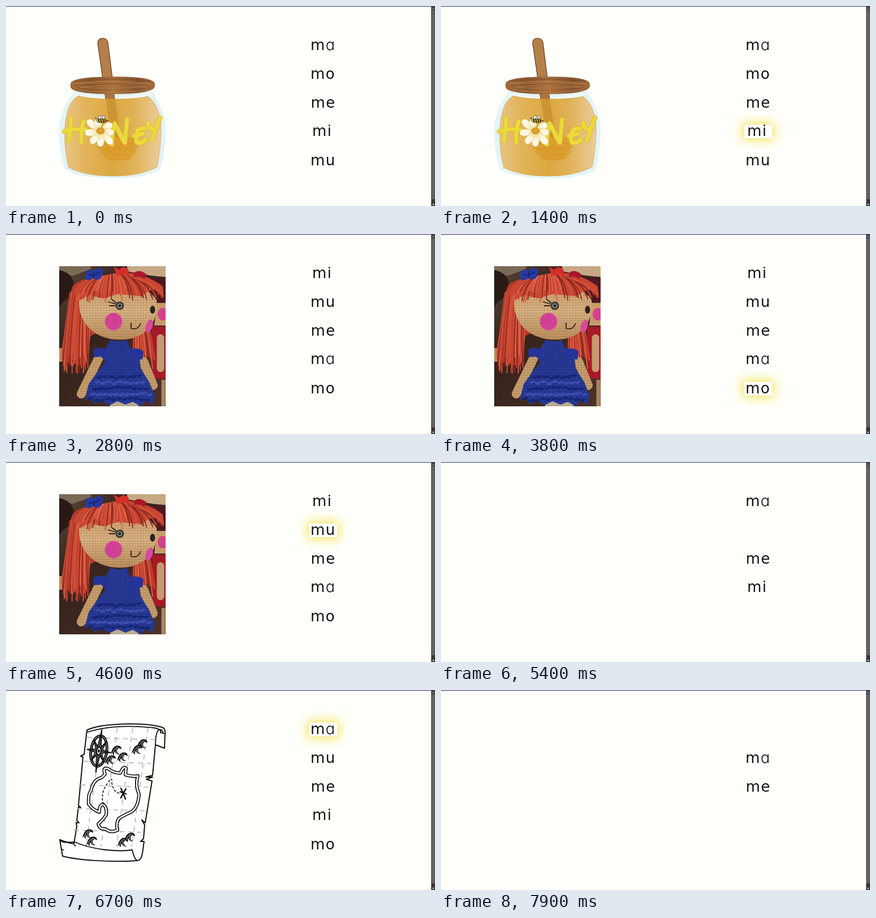
Write an HTML page that moves like this. It is 758x354 px and loops after 8 s.

```html
<!DOCTYPE html>
<html lang="en">
<head>
<meta charset="utf-8">
<title>Syllable match</title>
<style>
  html, body { margin: 0; width: 100%; height: 100%; overflow: hidden; background: #fffffb; }
  svg { position: absolute; left: 0; top: 0; }
  #glow { position: absolute; left: 536px; width: 49px; height: 24px; background: #fffffe;
    box-shadow: 0 0 18px 4px #f3e766; }
  .word { position: absolute; white-space: pre; color: #111;
    font: 26px/40px "DejaVu Sans", sans-serif; letter-spacing: 1.3px; }
  .word i { font: 350 27px/1 Inter, sans-serif; font-feature-settings: "cv11"; font-optical-sizing: none; }
</style>
</head>
<body>
<svg id="stage" width="758" height="354" viewBox="0 0 758 354">
  <defs>
    <linearGradient id="honeyFill">
      <stop offset="0" stop-color="#e9c587"/><stop offset=".2" stop-color="#e3b45c"/>
      <stop offset=".5" stop-color="#dba83f"/><stop offset=".72" stop-color="#e0b158"/>
      <stop offset="1" stop-color="#ebcd9c"/>
    </linearGradient>
    <linearGradient id="lidFill">
      <stop offset="0" stop-color="#a06a3a"/><stop offset=".25" stop-color="#8a5630"/>
      <stop offset=".5" stop-color="#a9713c"/><stop offset=".8" stop-color="#855230"/>
      <stop offset="1" stop-color="#a36d3e"/>
    </linearGradient>
    <linearGradient id="petalFill">
      <stop offset="0" stop-color="#f3dc8c"/><stop offset=".5" stop-color="#fdf6dc"/>
      <stop offset="1" stop-color="#fffdf2"/>
    </linearGradient>
    <linearGradient id="backFill" x2=".9" y2="1">
      <stop offset="0" stop-color="#5d4a3a"/><stop offset=".35" stop-color="#33221c"/>
      <stop offset="1" stop-color="#4b3026"/>
    </linearGradient>
    <linearGradient id="skin" x2="0" y2="1">
      <stop offset="0" stop-color="#cda06c"/><stop offset=".5" stop-color="#dcb686"/>
      <stop offset="1" stop-color="#be925f"/>
    </linearGradient>
    <pattern id="knit" width="5" height="4.6" patternUnits="userSpaceOnUse">
      <path d="M0 1Q2.5 3 5 1M2 3.4h2" fill="none" stroke="#6e4524" stroke-opacity=".36"/>
    </pattern>
    <pattern id="knitBlue" width="5" height="4.6" patternUnits="userSpaceOnUse">
      <path d="M0 1Q2.5 3 5 1M2 3.4h2" fill="none" stroke="#0f1858" stroke-opacity=".5"/>
    </pattern>
    <clipPath id="photo"><path d="M94 57h188v248H94z"/></clipPath>
    <path id="face" d="M130 112C124 150 150 187 202 187C246 187 270 157 266 117C245 80 150 76 130 112Z"/>
    <path id="dress" d="M185 187Q200 193 213 187L218 201L235 210L238 238L253 262L263 286L258 303L248 294L238 305L224 297L211 302L197 296L183 303L169 295L157 301L148 291L139 294L146 266L162 243L175 228L172 208Z"/>
    <path id="arms" d="M164 219L133 283M243 226L260 268"/>
    <path id="isle" d="M175 149Q170 136 180 139Q190 147 202 147Q208 133 212 139L211 150Q224 154 233 152Q228 169 235 184Q234 208 221 216Q207 222 199 228Q194 237 197 248Q185 254 176 246Q165 247 163 237Q172 229 177 221Q179 207 171 202Q164 205 165 216Q154 213 146 202Q145 183 150 179Q154 158 169 155Z"/>
    <g id="wave">
      <path d="M-11 9C-9 -3 -3 -10 5 -8C9 -7 11 -3 9 -1C7 -4 3 -4 2 -1C0 4 3 7 7 9C2 9 -2 7 -3 3C-5 5 -5 7 -4 10C-7 9 -8 7 -8 5Z" fill="#111"/>
      <path d="M-7 5C-5 -1 -1 -6 4 -5M0 -2C-2 2 0 5 2 7" fill="none" stroke="#fff" stroke-width=".9"/>
    </g>
  </defs>

  <g id="honey">
    <path d="M121 150C115 164 94 178 94 224C94 250 99 274 104 290C128 302 160 305 190 305C222 305 253 301 272 290C278 272 282 247 282 218C281 181 264 166 259 150Z" fill="#e3f4f7"/>
    <path d="M121 157Q188 172 258 155" fill="none" stroke="#fff" stroke-width="5" opacity=".5"/>
    <path d="M162 66C161 55 178 54 180 64L188 128H171Z" fill="#b57f49" stroke="#69452a" stroke-width="1.3"/>
    <path d="M174 151H190L203 230H185Z" fill="#a87440" stroke="#805527"/>
    <path d="M128 159C150 166 225 167 250 160C262 166 275 190 274 222C273 250 270 270 267 285C240 298 215 301 190 301C160 301 133 297 111 286C106 268 103 245 104 219C106 184 114 167 128 159Z" fill="url(#honeyFill)" stroke="#d8a446" stroke-width=".8"/>
    <path d="M176 164H192L203 232H186Z" fill="#c98e2f" opacity=".75"/>
    <g id="dipper" fill="#dd9d2b" stroke="#cf8f25"></g>
    <path d="M114 138C114 128 150 125 190 125C237 125 263 129 263 138V143C259 153 226 156 189 156C150 156 117 153 114 144Z" fill="url(#lidFill)"/>
    <path d="M118 137Q190 130 258 138Q190 137 118 137M130 144Q185 136 249 143Q190 147 130 144M124 148Q190 157 252 148" fill="none" stroke="#b98148" stroke-width="1.7" opacity=".65"/>
    <path d="M121 133Q190 126 256 133M140 140Q190 136 231 140" fill="none" stroke="#6d4124" stroke-width="2" opacity=".45"/>
    <g id="label" fill="none" stroke-linecap="round" stroke-linejoin="round"></g>
    <g id="petals" fill="url(#petalFill)" stroke="#e2c46f" stroke-width=".6"></g>
    <ellipse cx="167" cy="221" rx="7" ry="5.5" fill="#dda02c" stroke="#b77c1c" stroke-width=".8"/>
    <ellipse cx="167" cy="198" rx="3" ry="4" fill="#fff" stroke="#444" stroke-width=".7" transform="rotate(-20 167 198)"/>
    <ellipse cx="172" cy="198" rx="2.6" ry="4" fill="#eef" stroke="#444" stroke-width=".7" transform="rotate(15 172 198)"/>
    <ellipse cx="169" cy="203" rx="9" ry="3.6" fill="#e5bd27" stroke="#222" stroke-width=".8"/>
    <path d="M163 200l2 6M167 200l2 6M171 200l2 6M175 201l1 4M160 200l-2 -2M179 203l2 0" stroke="#1b1714" stroke-width="1.7"/>
  </g>

  <g id="doll" clip-path="url(#photo)">
    <path d="M94 57h188v248H94z" fill="url(#backFill)"/>
    <path d="M214 57H282V76Q250 74 214 66Z" fill="#c5a984"/>
    <path d="M94 57H150V62L118 74 94 68Z" fill="#7b6a55"/>
    <path d="M94 64C112 66 124 82 119 98C112 120 104 112 94 130Z" fill="#2a1a16"/>
    <path d="M94 202h6v24h-6z" fill="#b98d61"/>
    <path d="M250 80Q276 72 282 84V120H262Z" fill="#501621"/>
    <path d="M266 122H282V162H262Z" fill="#c99a6c"/>
    <ellipse cx="277" cy="142" rx="9" ry="11" fill="#d3418c"/>
    <path d="M258 164H282V256H258Z" fill="#a51a26"/>
    <path d="M273 184V238" stroke="#c49a70" stroke-width="13" stroke-linecap="round"/>
    <path d="M278 258V305" stroke="#a98461" stroke-width="7"/>
    <path d="M118 92C130 78 160 74 200 78L216 150L150 180C143 200 148 220 138 234L104 226C108 180 104 125 118 92Z" fill="#b63a29"/>
    <path d="M222 165L252 160C262 185 258 205 262 225L226 200Z" fill="#a93425"/>
    <g id="tails" fill="none" stroke-width="1.8" stroke-linecap="round"></g>
    <use href="#face" fill="url(#skin)"/>
    <use href="#face" fill="url(#knit)"/>
    <g fill="none" stroke="#a92975" id="cheek"><circle cx="190" cy="155" r="15.5" fill="#d9489a" stroke="none"/></g>
    <ellipse cx="253" cy="163" rx="6" ry="12" fill="#d9489a" transform="rotate(18 253 163)"/>
    <circle cx="201" cy="127" r="7.5" fill="#3b3935"/><circle cx="201" cy="127" r="4.6" fill="#7b8080"/><circle cx="201" cy="127" r="2.2" fill="#171717"/>
    <ellipse cx="259" cy="134" rx="4.5" ry="7" fill="#28231f"/>
    <path d="M180 120l14 4M182 127l11 0M187 116l8 6M221 157V167Q233 171 238 158" fill="none" stroke="#30211b" stroke-width="1.8"/>
    <path d="M119 105C126 82 151 75 177 74C205 62 247 69 277 93L279 110L260 97L238 110L198 106L172 114L147 108L131 117Z" fill="#c94731"/>
    <g id="fringe" fill="none" stroke-width="1.8" stroke-linecap="round"></g>
    <path d="M140 70Q146 58 155 65Q166 55 172 66L168 78Q160 84 154 78Q144 86 140 78Z" fill="#2739a0"/>
    <path d="M146 72l9 1 11 -6M155 66v12" stroke="#17236d" stroke-width="2" fill="none"/>
    <path d="M190 58l10 5 7 -5 9 4 2 11 -13 -1 -9 2Z" fill="#d42f29"/>
    <path d="M226 69q9 -8 22 2l-3 9q-10 -7 -19 -3Z" fill="#a9182c"/>
    <g fill="none" stroke-width="16" stroke-linecap="round">
      <use href="#arms" stroke="#c9a06f"/><use href="#arms" stroke="url(#knit)"/>
    </g>
    <path d="M184 294h50v11h-50z" fill="#b9aa93"/>
    <use href="#dress" fill="#293c99"/>
    <use href="#dress" fill="url(#knitBlue)"/>
    <path d="M154 205Q165 197 181 207L176 226L168 217L155 218ZM218 204Q236 200 243 208L241 222L230 221L222 226Z" fill="#263398"/>
    <g id="lace" fill="none" stroke-width="2"></g>
  </g>

  <g id="map" fill="none" stroke="#111" stroke-width="1.8" stroke-linejoin="round" stroke-linecap="round">
    <path d="M143 71C170 58 245 57 276 66Q282 68 281 77L280 103L264 97L259 151L247 154L259 154L248 158L258 161L246 235L240 230L245 239L243 263L238 268L244 268C241 285 242 301 232 302C190 305 130 302 100 294L95 265Q109 271 120 272L125 242L124 235L129 235L125 231L128 207L132 208L128 204L136 119L132 117L138 114Z" fill="#fffffd" stroke-width="2"/>
    <g id="grid" stroke="#b1b1b1" stroke-width="1.5" stroke-dasharray="9 7" stroke-linecap="butt"></g>
    <path d="M143 75Q190 59 262 67Q276 70 273 76M264 97Q264 78 269 71Q276 68 278 77M273 75l6 2"/>
    <path d="M95 265Q109 271 121 269C154 283 196 287 223 283Q227 300 232 302M121 269Q118 274 123 276M97 268l7 2M98 282l4 1" fill="#fffffd"/>
    <use href="#isle" stroke-width="6"/>
    <use href="#isle" stroke="#fffffd" stroke-width="2.6"/>
    <path d="M172 202Q166 181 181 163Q188 151 187 165Q191 185 204 182" stroke-dasharray="3 4" stroke-width="1.6"/>
    <path d="M203 174Q207 182 211 193M212 175Q207 182 203 191M202 180l10 4" stroke-width="2.4"/>
    <g transform="rotate(8 164 108)">
      <ellipse cx="164" cy="108" rx="14" ry="27" stroke-width="5"/>
      <ellipse cx="164" cy="108" rx="14" ry="27" stroke="#aaa" stroke-width="1"/>
      <path d="M164 70L167 100L175 90L170 105L185 108L170 111L175 126L167 116L164 146L161 116L153 126L158 111L143 108L158 105L153 90L161 100Z" fill="#777" stroke-width="1.6"/>
      <path d="M164 70V146M143 108H185M153 90L175 126M175 90L153 126" stroke-width="1.2"/>
      <ellipse cx="164" cy="108" rx="4" ry="7" fill="#eee" stroke-width="2.2"/><ellipse cx="164" cy="108" rx="1" ry="2"/>
    </g>
    <g id="waves" stroke="none"></g>
  </g>

  <path d="M0 0H758V1H0Z" fill="#352c5c"/>
  <path d="M751 1H758V354H751Z" fill="#626262"/>
  <path d="M752 1H758V8H752Z" fill="#4a4648"/>
  <path d="M752 342H758V354H752Z" fill="#3b3638"/>
  <path d="M753 6l2 -3 2 3Z" fill="#777"/>
  <path d="M753 350l2 3 2 -3Z" fill="#ccc"/>
</svg>
<div id="glow"></div>
<script>
const $ = id => document.getElementById(id);
const add = (id, markup) => $(id).insertAdjacentHTML('beforeend', markup);

let seed = 7;
const rnd = (a, b) => {
  seed = (seed * 16807) % 2147483647;
  return a + (b - a) * seed / 2147483647;
};
const mix = (a, b, t) => a + (b - a) * t;

// Honey jar
[[197, 239, 35], [197, 249, 35], [198, 258, 31], [198, 267, 24]].forEach(([x, y, r]) =>
  add('dipper', `<ellipse cx="${x}" cy="${y}" rx="${r}" ry="${r > 30 ? 8 : 6}" opacity=".8"/>`));
const letters = 'M115 199Q114 222 111 239M137 204Q132 224 133 241M103 222Q120 216 141 219' +
  'M192 208Q186 228 187 245M192 208L209 241M214 201L210 242' +
  'M246 217Q236 215 232 222Q228 240 232 242Q240 243 247 237M226 230L242 226' +
  'M251 207Q253 219 262 218M272 198Q263 222 258 237';
[['#cfb02e', 8.6], ['#ecd93a', 7.2]].forEach(([color, w]) =>
  add('label', `<path d="${letters}" stroke="${color}" stroke-width="${w}"/>`));
[[-142, 30], [-108, 22], [-32, 24], [8, 24], [48, 31], [90, 28], [127, 28], [171, 28]].forEach(([deg, len]) =>
  add('petals', `<path d="M3 0C8 -7 ${len - 6} -9 ${len} -2Q${len} 7 ${len - 9} 6Q10 6 3 0Z" transform="translate(167 221) rotate(${deg})"/>`));

// Doll: yarn, cheek and lace
const yarn = ['#e2654b', '#d5513a', '#c54430', '#8e281f'];
function strands(id, n, from, to, bend) {
  for (let i = 0; i < n; i++) {
    const t = i / (n - 1);
    const [x, y] = from(t), [u, v] = to(t);
    add(id, `<path d="M${x} ${y}Q${mix(x, u, .5) + bend(t)} ${mix(y, v, .4)} ${u} ${v}" stroke="${yarn[Math.floor(rnd(0, 4))]}"/>`);
  }
}
strands('tails', 42, t => [mix(113, 149, t), mix(104, 86, t)],
  t => [mix(98, 146, t), rnd(215, 249)], () => rnd(-5, 3));
strands('tails', 20, t => [mix(225, 252, t), 164], t => [mix(224, 263, t), rnd(205, 240)], () => rnd(-4, 4));
strands('fringe', 58, t => [mix(154, 235, t), 81 - 10 * Math.sin(Math.PI * t)],
  t => [mix(124, 278, t), rnd(101, 123) - 8 * t], t => mix(-9, 15, t));
[12, 8.5, 5, 2].forEach(r => add('cheek', `<circle cx="190" cy="155" r="${r}" stroke-dasharray="3 1"/>`));
for (let row = 0; row < 5; row++) {
  const y = 251 + row * 10, left = 160 - row * 4, right = 238 + row * 4;
  for (let x = left; x < right; x += 10)
    add('lace', `<path d="M${x} ${y + rnd(-2, 2)}q5 ${rnd(5, 9)} 10 0m-7 4l4 -5" stroke="${row % 2 ? '#4153b5' : '#152170'}"/>`);
}

// Treasure map
[170, 197, 224, 251].forEach(x => add('grid', `<path d="M${x} 67L${x - 29} 277"/>`));
[86, 128, 170, 212, 250].forEach(y => {
  const shift = (y - 86) * .14;
  add('grid', `<path d="M${143 - shift} ${y - 2}L${262 - shift} ${y + 2}"/>`);
});
[[241, 95], [232, 105], [195, 106], [185, 123], [206, 118],
 [145, 254], [152, 267], [207, 269], [219, 260]].forEach(([x, y]) =>
  add('waves', `<use href="#wave" transform="translate(${x} ${y}) scale(.9)"/>`));

// Words
const rowY = [70, 121, 172, 222, 274];
const wordX = { ma: 538, mo: 538, me: 538.5, mi: 541, mu: 538 };
const slots = rowY.map(y => {
  const el = document.createElement('div');
  el.className = 'word';
  el.style.top = y - 21 + 'px';
  document.body.append(el);
  return el;
});

const jar = ['honey', 'ma mo me mi mu'];
const toy = ['doll', 'mi mu me ma mo'];
const chart = ['map', 'ma mu me mi mo'];
// start time, picture, words ("-" is empty), highlighted row
const steps = [
  [0, ...jar, -1], [1400, ...jar, 3], [1900, ...jar, -1],
  [2800, ...toy, -1], [3700, ...toy, 4], [3900, ...toy, 3], [4100, ...toy, 2], [4300, ...toy, 1],
  [5400, '', 'ma - me mi -', -1], [5500, ...chart, -1],
  [6300, ...chart, 1], [6400, ...chart, -1], [6600, ...chart, 0],
  [7900, '', '- ma me - -', -1]
];
const loop = 8000;
let shown;

function show(step) {
  const [, picture, words, row] = step;
  ['honey', 'doll', 'map'].forEach(id => $(id).style.display = id === picture ? '' : 'none');
  words.split(' ').forEach((word, i) => {
    // round, single-storey "a"
    slots[i].innerHTML = word.replace('-', '').replace('a', '<i>a</i>');
    slots[i].style.left = (wordX[word] || 0) + 'px';
  });
  $('glow').style.display = row < 0 ? 'none' : '';
  if (row >= 0) $('glow').style.top = rowY[row] - 12 + 'px';
}

const start = performance.now();
function draw(now) {
  const t = Math.max(0, now - start) % loop;
  const step = steps.findLast(s => s[0] <= t);
  if (step !== shown) show(shown = step);
  requestAnimationFrame(draw);
}
draw(start);
</script>
</body>
</html>
```
